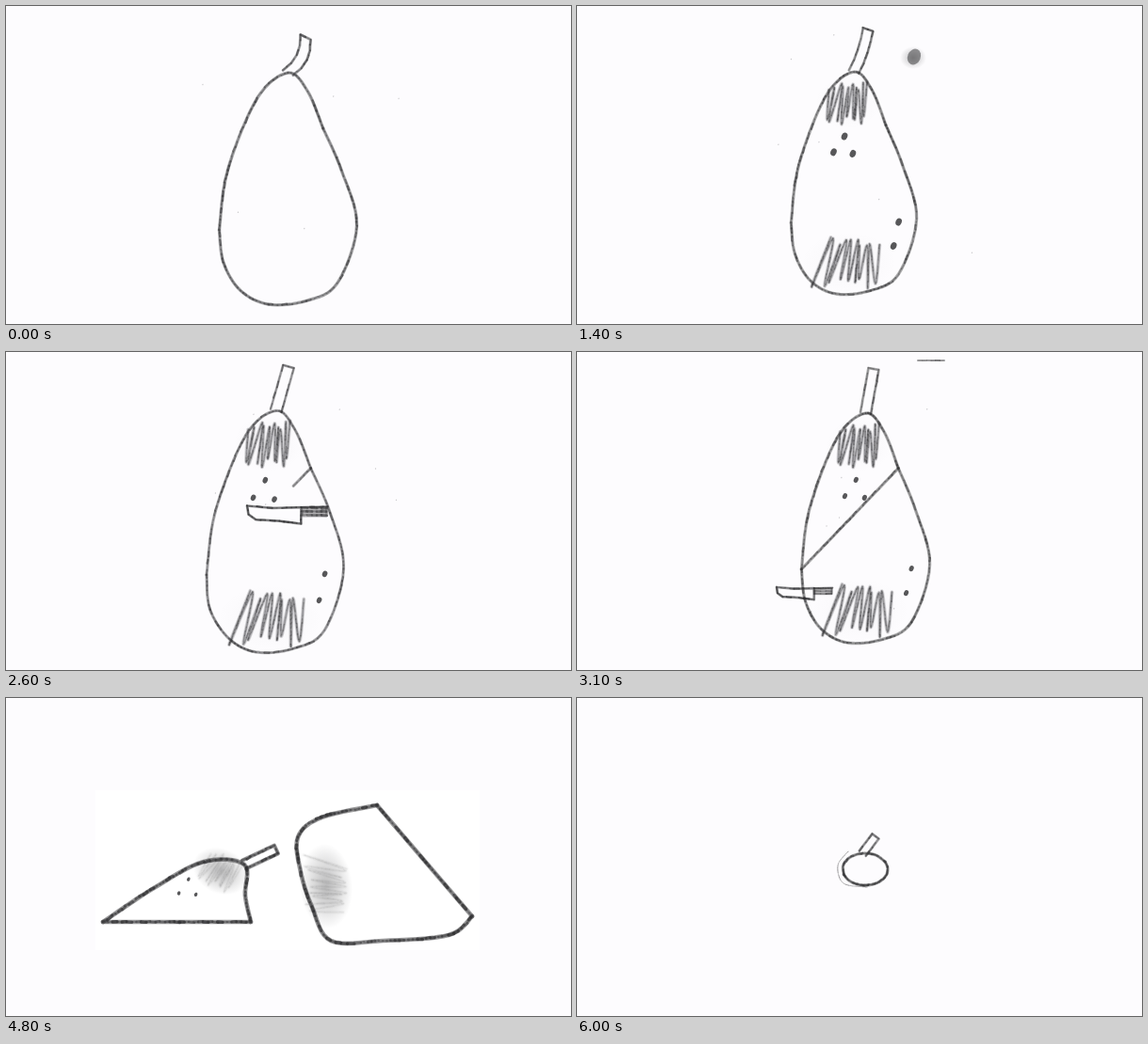
An HTML page with a canvas for the animation above (6100 ms loop, 600 by 338 pixels).

```html
<!DOCTYPE html>
<html lang="en">
<head>
<meta charset="utf-8">
<title>Pear</title>
<style>
  html, body { margin: 0; width: 100%; height: 100%; overflow: hidden; background: #fdfcfe; }
  canvas { display: block; width: 100vw; height: 100vh; }
</style>
</head>
<body>
<canvas id="stage" width="600" height="338"></canvas>
<script>
const ctx = document.getElementById('stage').getContext('2d');
const FRAME = 100, FRAMES = 61, HELD = [5, 13, 20, 27, 44, 52];
const CROWN = 3; // outline point that carries the stem

const mix = (a, b, u) => a + (b - a) * u;
const mixPoint = (a, b, u) => [mix(a[0], b[0], u), mix(a[1], b[1], u)];
const add = (a, b, k = 1) => [a[0] + b[0] * k, a[1] + b[1] * k];
const ramp = (n, from, to) => Math.max(0, Math.min(1, (n - from) / (to - from)));
const noise = i => { const s = Math.sin(i * 127.1 + 11.7) * 43758.5453; return s - Math.floor(s); };
const points = text => text.split(' ').map(p => p.split(',').map(Number));
const rotate = ([x, y], a) => [x * Math.cos(a) - y * Math.sin(a), x * Math.sin(a) + y * Math.cos(a)];
const centre = list => list.reduce((sum, p) => add(sum, p, 1 / list.length), [0, 0]);

// A half holds its outline, the middle of its spots, the middle of its shading and, on top, the stem tip.
function half(outline, spots, shade, tip = shade) {
  return { outline, anchors: [spots, shade, tip] };
}

// The whole pear in a unit box, divided along the cut.
const PEAR_TOP = points('.01,.68 .07,.42 .28,.11 .5,0 .64,.08 .75,.24');
const PEAR_BASE = points('.75,.24 .88,.42 .99,.66 .85,.91 .63,.985 .36,1 .16,.94 .04,.82 .01,.68');

function pear(x, y, w, h, tip, weight) {
  const place = ([px, py]) => [x + px * w, y + py * h];
  return {
    weight, size: [w, h], turns: [0, 0],
    halves: [
      half(PEAR_TOP.map(place), place([.42, .34]), place([.45, .14]), tip),
      half(PEAR_BASE.map(place), place([.83, .73]), place([.46, .86]))
    ]
  };
}

const split = {
  weight: 2.9, size: [140, 220], turns: [0, 0],
  halves: [
    half(points('158,243 184,168 222,103 248,91 274,112 283,182'), [245, 177], [234, 128], [267, 46]),
    half(points('408,84 427,145 430,200 400,274 350,297 307,296 284,264 270,225 268,188'), [396, 235], [338, 269])
  ]
};

const fallen = {
  weight: 4.3, size: [120, 200], turns: [.45, 1.5],
  halves: [
    half(points('103,238 157,202 210,174 253,177 254,210 260,238'), [193, 203], [228, 184], [287, 161]),
    half(points('495,232 470,252 400,258 345,258 325,222 313,185 310,148 335,127 394,114'), [420, 240], [340, 200])
  ]
};

const seedArc = (count, from, to) => Array.from({ length: count }, (_, i) =>
  add([306, 182], rotate([1, 0], mix(from, to, i / (count - 1))).map((v, k) => v * (k ? 17 : 24))));
const SEED = [306, 182];
const tiny = {
  weight: 3, size: [110, 60], turns: fallen.turns,
  halves: [half(seedArc(6, 2.8, 5.8), SEED, SEED, [317, 147]), half(seedArc(9, -.5, 2.8), SEED, SEED)]
};

const sliced = pear(237, 65, 139, 244, [315, 18], 3);
const KEYS = [
  [0, pear(225, 71, 149, 246, [318, 33], 3.1)],
  [14, pear(226, 70, 136, 236, [309, 25], 3)],
  [21, pear(186, 58, 160, 272, [285, 13], 2.7)],
  [31, sliced], [34, sliced], [39, split], [48, fallen], [52, fallen], [58, tiny], [60, tiny]
];

// Blends one half of two poses while turning it about its centre.
function blendHalf(from, to, side, u, shift, boil, n) {
  const a = from.halves[side], b = to.halves[side];
  const ca = centre(a.outline), cb = centre(b.outline);
  const ta = from.turns[side], tb = to.turns[side];
  const middle = add(mixPoint(ca, cb, u), [shift, 0]);
  const move = (p, q) => add(middle, rotate(
    mixPoint(rotate(add(p, ca, -1), -ta), rotate(add(q, cb, -1), -tb), u), mix(ta, tb, u)));
  const last = a.outline.length - 1;
  const outline = a.outline.map((p, i) => {
    const seed = n * 53 + i * 7 + side;
    const shake = i % last ? boil : 0;
    return add(move(p, b.outline[i]), [noise(seed) - .5, noise(seed + .5) - .5], shake);
  });
  const [spots, shade, tip] = a.anchors.map((p, i) => move(p, b.anchors[i]));
  return { outline, spots, shade, tip, turn: mix(ta, tb, u) };
}

// Catmull-Rom curve through the points.
function curve(list) {
  const out = [];
  for (let i = 0; i < list.length - 1; i++) {
    const a = list[i - 1] || list[i], b = list[i], c = list[i + 1], d = list[i + 2] || c;
    for (let t = 0; t < 1; t += .125) {
      out.push([0, 1].map(k => b[k] + .5 * t * (c[k] - a[k]
        + t * (2 * a[k] - 5 * b[k] + 4 * c[k] - d[k] + t * (3 * (b[k] - c[k]) + d[k] - a[k])))));
    }
  }
  return [...out, list[list.length - 1]];
}

function stroke(list, width, ink) {
  ctx.strokeStyle = `rgba(45,45,47,${ink})`;
  ctx.lineWidth = width;
  ctx.beginPath();
  list.forEach(p => ctx.lineTo(...p));
  ctx.stroke();
}

// Graphite: a soft continuous line with uneven, darker strokes over it.
function pencil(list, weight, ink, seed = 0) {
  ctx.lineCap = ctx.lineJoin = 'round';
  stroke(list, weight * 1.1, ink * .5);
  let k = seed * 97;
  for (let i = 0; i < list.length - 1; i++) {
    const [a, b] = [list[i], list[i + 1]];
    const steps = Math.max(1, Math.round(Math.hypot(b[0] - a[0], b[1] - a[1]) / 5));
    for (let s = 0; s < steps; s++) {
      const grain = noise(k++), side = (noise(k + .5) - .5) * weight * .35;
      const start = add(mixPoint(a, b, s / steps), [side, side]);
      stroke([start, mixPoint(a, b, (s + 1) / steps)], weight * (.5 + .3 * grain), ink * (.35 + .45 * grain));
    }
  }
}

function smudge([x, y], rx, ry, turn, ink) {
  ctx.save();
  ctx.translate(x, y);
  ctx.rotate(turn);
  ctx.scale(rx, ry);
  const g = ctx.createRadialGradient(0, 0, 0, 0, 0, 1);
  g.addColorStop(0, `rgba(80,80,82,${ink})`);
  g.addColorStop(1, 'rgba(80,80,82,0)');
  ctx.fillStyle = g;
  ctx.fillRect(-1, -1, 2, 2);
  ctx.restore();
}

function spot([x, y], r, ink) {
  ctx.fillStyle = `rgba(45,45,47,${ink})`;
  ctx.beginPath();
  ctx.ellipse(x, y, r * .85, r * 1.1, .4, 0, 7);
  ctx.fill();
}

// Up-and-down shading that leans outwards at the lower end.
function hatch(middle, w, h, turn, ink, seed) {
  const line = Array.from({ length: 19 }, (_, i) => {
    const x = i / 18 - .5 + (noise(i + seed) - .5) * .12;
    const y = (i % 2 ? .5 : -.5) * (.65 + .5 * noise(i * 3 + seed));
    return add(middle, rotate([x * w * (1 + y * .3) - y * w * .12, y * h], turn));
  });
  stroke(curve(line), 4, ink * .35);
  pencil(curve(line), 2.2, ink, seed);
}

function drawStem(base, tip, width, bend, weight, ink, n) {
  const [dx, dy] = add(tip, base, -1), length = Math.hypot(dx, dy) || 1;
  const across = [-dy / length, dx / length];
  const side = k => [0, .25, .5, .75, 1].map(u =>
    add(mixPoint(base, tip, u), across, k * width / 2 - bend * 4 * u * (1 - u)));
  pencil([...side(-1), ...side(1).reverse()], weight, ink, n);
}

function drawHalf(isBase, { outline, spots, shade, tip, turn }, weight, [w, h], n) {
  const ink = .3 + .15 * weight;
  const leaving = 1 - ramp(n, 52, 57), toppled = ramp(n, 40, 48);
  const haze = (.03 * ramp(n, 2, 14) + .36 * toppled) * leaving;
  const shading = .48 * ramp(n, 1, 13) * mix(1, .12, toppled) * leaving;
  const [shadeW, shadeH] = isBase ? [w * .47, h * .2] : [w * .32, h * .17];
  if (haze) smudge(shade, shadeW * .8, shadeH * .7, turn, haze);
  if (shading) hatch(shade, shadeW, shadeH, turn, shading, isBase ? 4 : 3);

  pencil(curve(outline), weight, ink, n + isBase);
  if (!isBase) drawStem(outline[CROWN], tip, w * .08, -6 * (1 - ramp(n, 0, 21)), weight * .85, ink, n);

  // The knife opens the cut from the right; each half keeps its own edge.
  const opened = ramp(n, 25, 31), cutInk = ink * (1 - ramp(n, 53, 58));
  if (opened && cutInk && (!isBase || n > 34)) {
    const first = outline[0], last = outline[outline.length - 1];
    pencil([last, mixPoint(last, first, opened)], weight, cutInk, n + 9);
  }

  const count = isBase ? 2 : 3;
  const radius = (4.4 - n / 20) * ramp(n, 6, 13) * leaving * (isBase ? 1 - ramp(n, 41, 46) : 1);
  for (let i = 0; i < count && radius > .2; i++) {
    const offset = isBase ? [3, -14] : rotate([1, -13], i * 2 * Math.PI / 3);
    spot(add(spots, offset, (isBase ? 1 - 2 * i : 1) * w / 150), radius, .8);
  }
}

function drawKnife(n) {
  if (n === 14 || n === 15) {
    smudge([357, 55], 14, 12, 0, .35);
    spot([358, 54], 8, .5);
  }
  if (n < 16 || n > 33) return;
  const travel = ramp(n, 21, 31);
  const scale = ramp(n, 15, 21) * mix(1, .53, travel) * (1 - ramp(n, 31, 34));
  const corner = [mix(300, 212, travel) + 50 * (1 - ramp(n, 15, 21)), mix(77, 250, travel)];
  const line = text => points(text).map(p => add(corner, p, scale));
  pencil(line('0,0 35,3 75,2 75,25 45,21 12,19 2,12 0,0'), 2.5, .95, n);
  pencil(line('75,2 112,1'), 2, .9, n);
  pencil(line('77,3 110,3 110,13 77,13 77,8 110,8'), 5 * scale, .75, n);
}

function drawMarks(n) {
  if (n === 21 || n === 22) pencil([[303, 37], [315, 27]], 1.7, .65, n);
  if (n === 31) pencil([[362, 9], [390, 9]], 1.8, .75, n);
  if (n >= 37 && n <= 40) for (let i = 0; i < 5; i++) {
    const start = i < 2 ? [278 + 8 * i, 31 - i] : [254 + 7 * i, 99 - 4 * i];
    pencil([start, add(start, [5, 11])], 2.3, .7, n + i);
  }
  if (n >= 58) pencil(curve([[288, 163], [277, 178], [283, 197], [308, 201]]), .9, .45, n);
  if (n < 45) for (let i = 0; i < 6; i++) {
    spot([190 + 230 * noise(n * 9 + i), 30 + 280 * noise(n * 13 + i + .4)], .7, .25);
  }
}

function drawPaper(list) {
  const [xs, ys] = [0, 1].map(k => list.map(p => p[k]));
  const left = Math.min(...xs) - 8, top = Math.min(...ys) - 16;
  ctx.fillStyle = '#fff';
  ctx.fillRect(left, top, Math.max(...xs) + 8 - left, Math.max(...ys) + 10 - top);
}

function draw(n) {
  ctx.fillStyle = '#fdfcfe';
  ctx.fillRect(0, 0, 600, 338);
  const next = Math.max(1, KEYS.findIndex(([start], i) => start > n || i === KEYS.length - 1));
  const [[start, from], [end, to]] = [KEYS[next - 1], KEYS[next]];
  const u = ramp(n, start, end);
  const boil = u % 1 ? 3 : 0;
  const spread = 42 * Math.sin(Math.PI * ramp(n, 39, 48)) + 32 * Math.sin(Math.PI * ramp(n, 48, 57));
  const halves = [0, 1].map(side => blendHalf(from, to, side, u, side ? spread : -spread, boil, n));

  if (n >= 45 && n < 58) drawPaper(halves.flatMap(h => h.outline));
  halves.forEach((h, side) =>
    drawHalf(side, h, mix(from.weight, to.weight, u), mixPoint(from.size, to.size, u), n));
  drawKnife(n);
  drawMarks(n);
}

function tick() {
  const frame = Math.floor(performance.now() / FRAME) % FRAMES;
  draw(HELD.includes(frame) ? frame - 1 : frame);
  requestAnimationFrame(tick);
}
tick();
</script>
</body>
</html>
```
